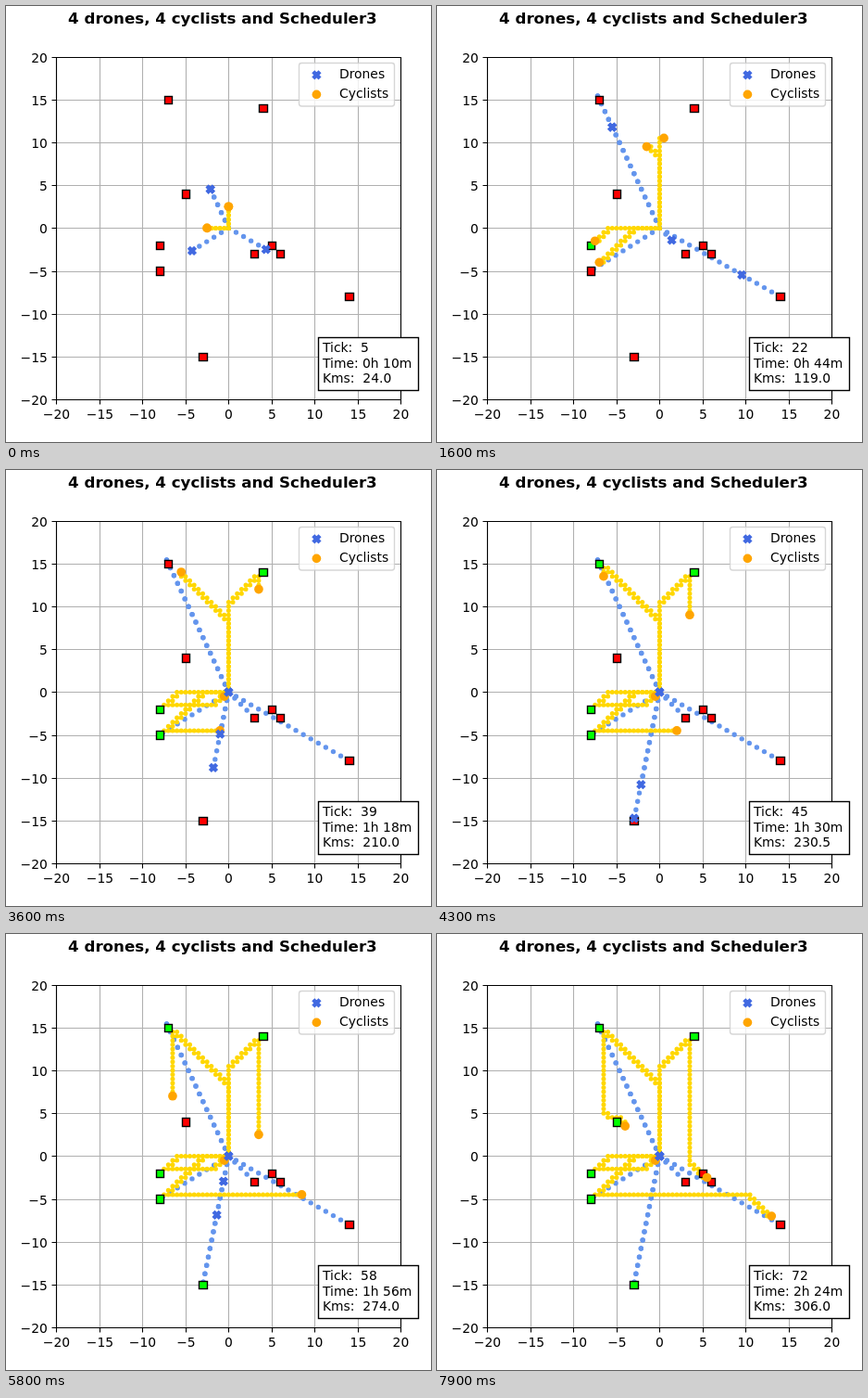
An HTML page for the animation above (8000 ms loop, 459 by 470 pixels).

```html
<!DOCTYPE html>
<html lang="en">
<head>
<meta charset="utf-8">
<title>Delivery simulation</title>
<style>
  html, body { margin: 0; width: 100%; height: 100%; overflow: hidden; background: #fff; }
  svg { display: block; }
  text { font: 13.89px "DejaVu Sans", sans-serif; white-space: pre; }
  .title { font-size: 16.67px; font-weight: bold; }
</style>
</head>
<body>
<svg width="459" height="470" viewBox="0 0 459 470">
  <g id="axes"></g>
  <g id="scene"></g>
  <g id="legend"></g>
  <g id="info"></g>
</svg>
<script>
const LOOP = 8000, SLOT = 100;
const $ = id => document.getElementById(id);
const X = x => 240.4 + 9.3 * x;
const Y = y => 239.4 - 9.24 * y;
const snap = v => Math.round(v) + .5;

// Runs of one tick per slot: first slot, first tick, length. The last tick then holds.
const RUNS = [[0, 5, 5], [5, 11, 16], [22, 28, 2], [32, 35, 5], [38, 40, 3], [42, 44, 3],
  [46, 47, 3], [50, 51, 2], [53, 53, 4], [58, 58, 1], [61, 59, 3], [65, 62, 5],
  [71, 67, 1], [73, 68, 1], [75, 70, 2], [79, 72, 1]];

// Customers: x, y and the tick of full delivery.
const CUSTOMERS = [[-7, 15, 43], [4, 14, 36], [-5, 4, 67], [-8, -2, 22], [-8, -5, 26],
  [-3, -15, 50], [3, -3], [5, -2], [6, -3], [14, -8]];

// Each path holds one [x, y, km] per tick.
function drone(...stops) {
  const path = [[0, 0, 0]];
  for (const [x, y] of stops) {
    const d = Math.hypot(x, y), n = Math.round(d);
    const go = (k, km) => path.push([x / d * k, y / d * k, km]);
    if (path.length > 1) go(0, 0);
    for (let k = 1; k <= n; k++) go(k, 1);
    go(n, 0);
    for (let k = n - 1; k >= 0; k--) go(k, 1);
  }
  path.push([0, 0, 1]);
  return path;
}

// Stops: x, y, ticks of waiting. Always steps along the longer remaining axis.
function cyclist(...stops) {
  const path = [[0, 0, 0]];
  let x = 0, y = 0;
  for (const [tx, ty, wait = 0] of stops) {
    for (;;) {
      const dx = tx - x, dy = ty - y;
      if (Math.max(Math.abs(dx), Math.abs(dy)) <= .5) break;
      if (Math.abs(dx) > Math.abs(dy)) x += Math.sign(dx) / 2;
      else y += Math.sign(dy) / 2;
      path.push([x, y, .5]);
    }
    for (let i = 0; i < wait; i++) path.push([x, y, 0]);
  }
  path.push([x, y, .5]);
  return path;
}

const drones = [
  drone([-7, 15]),
  drone([-7, 15]),
  drone([-8, -5], [3, -3], [-3, -15]),
  drone([14, -8], [-3, -15])
];
const cyclists = [
  cyclist([-8, -2, 4], [0, 0]),
  cyclist([-8, -5, 2], [14, -8]),
  cyclist([-7, 15, 1], [-5, 4, 2], [0, 0]),
  cyclist([4, 14, 2], [6, -3])
];

const text = (x, y, s, attrs = '') => `<text x="${x}" y="${y}" ${attrs}>${s}</text>`;
const cross = (x, y) =>
  `<path transform="translate(${x} ${y}) scale(2.083)" fill="#4169e1" stroke="#4169e1" stroke-width=".667"
    d="M-1-2 0-1 1-2 2-1 1 0 2 1 1 2 0 1-1 2-2 1-1 0-2-1z"/>`;
const disc = (x, y) => `<circle cx="${x}" cy="${y}" r="4.86" fill="#ffa500"/>`;
const trail = (path, tick, color, size) =>
  `<path stroke="${color}" stroke-width="${size}" stroke-linecap="round" d="${
    path.slice(0, tick + 1).map(([x, y]) => `M${X(x).toFixed(2)} ${Y(y).toFixed(2)}h0`).join('')}"/>`;
const at = (path, tick, mark) => {
  const [x, y] = path[Math.min(tick, path.length - 1)];
  return mark(X(x), Y(y));
};
const box = (left, top, right, bottom, attrs) =>
  `<rect x="${left}" y="${top}" width="${right - left}" height="${bottom - top}" stroke-width="1.39" ${attrs}/>`;

function drawAxes() {
  const left = snap(X(-20)), right = snap(X(20)), top = snap(Y(20)), bottom = snap(Y(-20));
  let grid = '', ticks = '', labels = '';
  for (let v = -20; v <= 20; v += 5) {
    const x = snap(X(v)), y = snap(Y(v)), s = String(v).replace('-', '\u2212');
    grid += `M${x} ${top}V${bottom}M${left} ${y}H${right}`;
    ticks += `M${x} ${bottom}v5M${left} ${y}h-5`;
    labels += text(x - .1, 444.5, s, 'text-anchor="middle"') +
      text(44.8, y + 5.5, s, 'text-anchor="end"');
  }
  $('axes').innerHTML =
    text(233.9, 19, '4 drones, 4 cyclists and Scheduler3', 'class="title" text-anchor="middle"') +
    `<path d="${grid}" stroke="#b0b0b0" stroke-width="1.1"/>` +
    `<path d="${ticks}M${left} ${top}H${right}V${bottom}H${left}z" fill="none" stroke="#000" stroke-width="1.1"/>` +
    labels;
}

function drawLegend() {
  $('legend').innerHTML =
    box(316.5, 61.5, 419.5, 108, 'rx="2.8" fill="#fff" fill-opacity=".8" stroke="#ccc" stroke-opacity=".8"') +
    cross(335.4, 74.4) + text(360, 78, 'Drones') +
    disc(335.4, 95.4) + text(360, 99, 'Cyclists');
}

function customer([x, y, done], tick) {
  const px = X(x), py = Y(y), half = 4.17;
  return box(snap(px - half), snap(py - half), snap(px + half), snap(py + half),
    `fill="${tick >= done ? '#0f0' : '#f00'}" stroke="#000"`);
}

function kms(tick) {
  let sum = 0;
  for (const path of [...drones, ...cyclists])
    for (const [, , km] of path.slice(2, tick + 1)) sum += km;
  return sum.toFixed(1);
}

function draw(tick) {
  $('scene').innerHTML =
    drones.map(p => trail(p, tick, '#6495ed', 5.4)).join('') +
    cyclists.map(p => trail(p, tick, '#ffd700', 5)).join('') +
    CUSTOMERS.map(c => customer(c, tick)).join('') +
    cyclists.map(p => at(p, tick, disc)).join('') +
    drones.map(p => at(p, tick, cross)).join('');

  const hours = Math.floor(tick / 30), minutes = tick * 2 % 60;
  $('info').innerHTML =
    box(337.5, 357.5, minutes < 10 ? 436.5 : 445.5, 414.5, 'fill="#fff" stroke="#000"') +
    text(342, 373, `Tick:  ${tick}`) +
    text(342, 390, `Time: ${hours}h ${minutes}m`) +
    text(342, 406, `Kms:  ${kms(tick)}`);
}

function tickAt(ms) {
  const slot = Math.floor(ms / SLOT);
  const [start, first, count] = RUNS.filter(r => r[0] <= slot).pop();
  return first + Math.min(slot - start, count - 1);
}

let shown, begin;
function frame(now) {
  begin ??= now;
  const tick = tickAt(Math.max(0, now - begin) % LOOP);
  if (tick !== shown) draw(shown = tick);
  requestAnimationFrame(frame);
}

drawAxes();
drawLegend();
draw(shown = tickAt(0));
requestAnimationFrame(frame);
</script>
</body>
</html>
```
